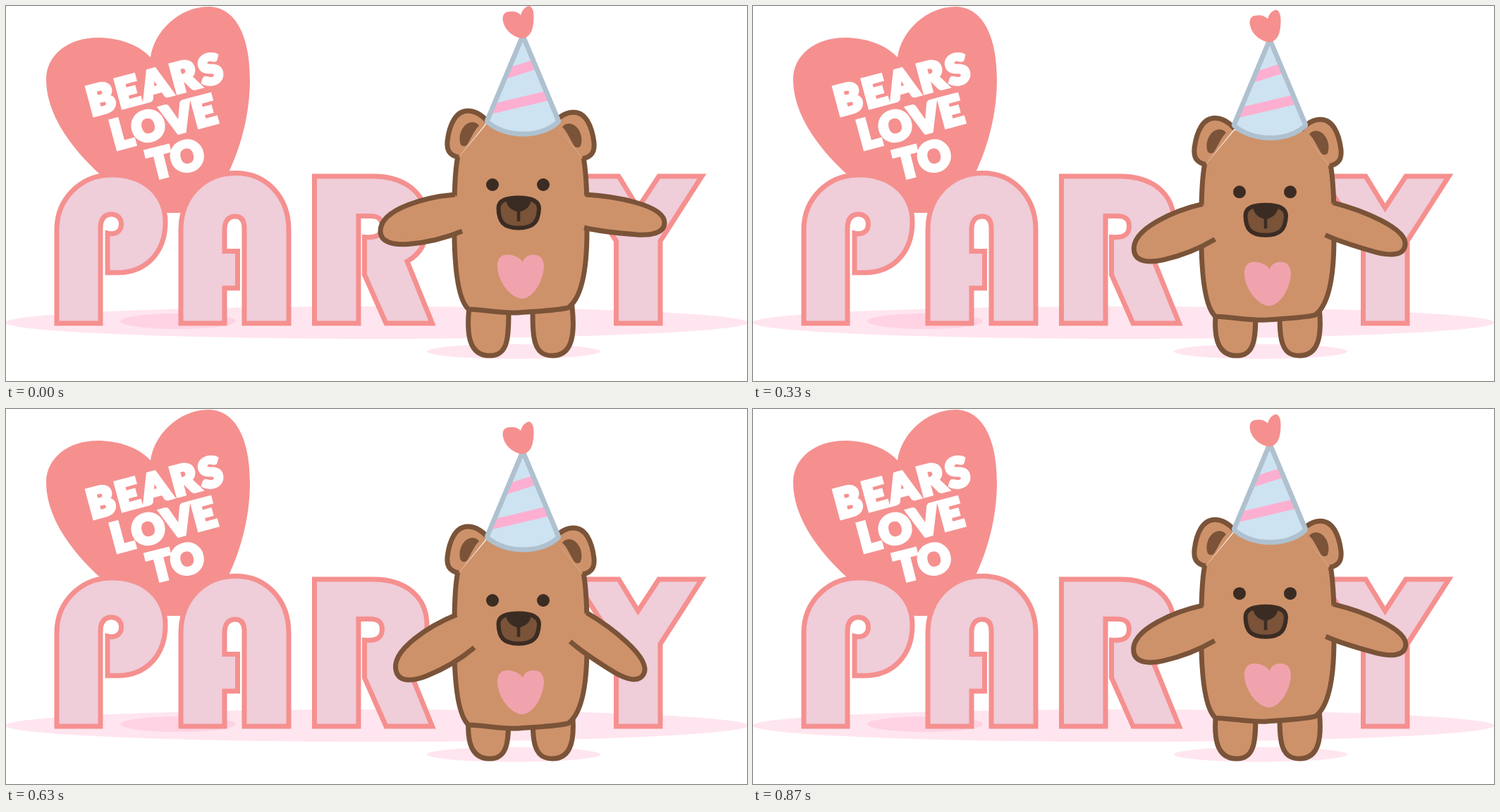
Write an HTML page that moves like this. It is 1051 px wide and 533 px high and loops after 900 ms.

```html
<!DOCTYPE html>
<html lang="en">
<head>
<meta charset="utf-8">
<title>Bears love to party</title>
<style>
  @property --body { syntax: "<length>"; inherits: true; initial-value: 0px; }
  @property --hat { syntax: "<length>"; inherits: true; initial-value: 0px; }
  @property --left { syntax: "<angle>"; inherits: true; initial-value: 0deg; }
  @property --right { syntax: "<angle>"; inherits: true; initial-value: 0deg; }

  html, body { margin: 0; width: 100%; height: 100%; overflow: hidden; background: #fff; }
  svg { display: block; width: 1051px; height: 533px; animation: dance 900ms infinite; }

  /* Every stretch advances in 30 ms steps */
  @keyframes dance {
    0%      { --body: 0px;    --hat: 0px;    --left: 0deg;     --right: 0deg;    animation-timing-function: steps(7); }
    23.333% { --body: 6px;    --hat: 3px;    --left: -4.6deg;  --right: 6deg;    animation-timing-function: steps(4); }
    36.667% { --body: 10.3px; --hat: 5.5px;  --left: -8.3deg;  --right: 11.3deg; animation-timing-function: steps(5); }
    53.333% { --body: 20.5px; --hat: 13.5px; --left: -21deg;   --right: 33deg;   animation-timing-function: steps(1); }
    56.667% { --body: 22.7px; --hat: 15px;   --left: -23.3deg; --right: 36.5deg; animation-timing-function: steps(1); }
    60%     { --body: 21.3px; --hat: 16px;   --left: -21.5deg; --right: 34deg;   animation-timing-function: steps(3); }
    70%     { --body: 18px;   --hat: 18px;   --left: -17.3deg; --right: 27.5deg; animation-timing-function: steps(4); }
    83.333% { --body: 16.5px; --hat: 20px;   --left: -15.5deg; --right: 25deg;   animation-timing-function: steps(2); }
    90%     { --body: 13.8px; --hat: 16.5px; --left: -12.5deg; --right: 19deg;   animation-timing-function: steps(2); }
    96.667%, 100% { --body: 8.2px; --hat: 7.5px; --left: -7.8deg; --right: 10.5deg; animation-timing-function: steps(1); }
  }

  .body { transform: translateY(var(--body)); }
  .hat { transform: translateY(var(--hat)); }
  .arm-left { transform-origin: 659px 263.5px; transform: rotate(var(--left)); }
  .arm-right { transform-origin: 815.6px 273px; transform: rotate(var(--right)); }

  .letters { fill: #efcdd9; stroke: #f5908f; stroke-width: 7; }
  .fur { fill: #ce926a; stroke: #7a5338; stroke-width: 7; }
  .brown { fill: #7a5338; }
  .dark { fill: #3b2c23; }
  .coral { fill: #f5908f; }
  .words { fill: #fff; stroke: #fff; stroke-width: 5; font: 900 57px Lato, "Open Sans", sans-serif; }
</style>
</head>
<body>
<svg viewBox="0 0 1051 533">
  <defs>
    <g id="ear">
      <path class="fur" d="M642 215C628 212 625 204 626 192C629 168 638 149 655 149C665 149 674 154 683 164"/>
      <path class="brown" d="M645 197C640 184 648 166 661 165C666 165 670 168 671 170C663 178 660 188 654 197C651 200 648 200 645 197Z"/>
    </g>
  </defs>

  <g fill="#ffe5ef">
    <ellipse cx="525.5" cy="450" rx="526" ry="23"/>
    <ellipse cx="244" cy="448" rx="82" ry="11" fill="#ffd3e3"/>
    <ellipse cx="720" cy="491" rx="123" ry="10.5"/>
  </g>

  <path class="coral" d="M205 73C187 54 159 45 130 45C88 45 57 70 57 104C57 160 102 210 131 237C165 275 195 294 232 294H246C280 285 305 255 317 234C335 195 346 150 346 104C346 40 324 1 287 1C247 1 210 35 205 73Z"/>
  <g class="words">
    <text transform="translate(121.500 156.500) rotate(-15)" letter-spacing="3.8">BEARS</text>
    <text transform="translate(155 204.500) rotate(-15)" letter-spacing="1.7">LOVE</text>
    <text transform="translate(207 247) rotate(-14)" letter-spacing="-.5">TO</text>
  </g>

  <g class="letters">
    <path d="M72 451V318C72 274 106 240 150 240C197 240 226 269 226 307C226 351 198 379 158 379H144V323C157 326 163.500 319 163.500 310C163.500 301 157 296 150 296C140 296 134 302 134 316V451Z"/>
    <path d="M248 451V318C248 271 281 237.500 326 237.500C369 237.500 401 271 401 318V451H338V316C338 304 333 299 325 299C316 299 310 305 310 318V348.500H328.500V401H310V451Z"/>
    <path d="M437.500 242H521C568 242 597 268 597 307C597 338 588 352 569 363L604.500 451H539L508.500 382V328.500C526 330 533.500 325 533.500 313C533.500 302 527 298.500 516 298.500H500V451H437.500Z"/>
    <path d="M806 242H869L896.500 287L926 242H987L928 334V451H865.500V334Z"/>
  </g>

  <g class="fur">
    <path d="M657 428C653 465 656 497 686 497C713 497 713 470 713 428Z"/>
    <path d="M803 428C807 465 804 497 775 497C747 497 747 470 747 428Z"/>
  </g>

  <g class="body">
    <path class="fur" d="M641 213C637 232 636 260 636 290C635 340 636 413 656 431C680 432 700 436 725 436C750 434 780 433 797 429C820 413 824 360 824 320C825 280 823 235 819 215"/>
    <path fill="#ce926a" d="M643 214L683 166C705 174 760 174 779 168L817 216L800 250H660Z"/>
    <use href="#ear"/>
    <use href="#ear" transform="translate(1460 2) scale(-1 1)"/>
    <circle class="dark" cx="690" cy="254" r="9"/>
    <circle class="dark" cx="762" cy="254" r="9"/>
    <path class="brown" stroke="#3b2c23" stroke-width="6" d="M698.500 288C698 276 710 272.500 727 272.500C744 272.500 756 276 756 288C755 306 749 315.500 727 315.500C705 315.500 699 306 698.500 288Z"/>
    <path class="dark" d="M709 276C715 272 739 272 745 276C743 287 735 291 727 293C719 291 711 287 709 276Z"/>
    <path stroke="#3b2c23" stroke-width="4.500" d="M727 290V306"/>
    <path fill="#f0a3ad" d="M733 364C735 356 742 353.500 749 353.500C759 354 763 361 763 371C761 395 746 416 731 416C716 414 699 394 697 372C696 360 702 353 711 353.500C722 354 729 358 733 364Z"/>
    <g class="arm-left">
      <path fill="#ce926a" d="M636 268L658 285L647 320L600 330V285Z"/>
      <path class="fur" d="M637 268C600 271 531 287 531 320C531 336 550 340 570 338.500C600 336 628 328 647 320"/>
    </g>
    <g class="arm-right">
      <path fill="#ce926a" d="M823 268L803 285L820 315L860 315V280Z"/>
      <path class="fur" d="M822 268C860 270 934 282 934 308C934 324 912 326 895 325C870 323 840 320 820 315"/>
    </g>
  </g>

  <g class="hat">
    <path fill="#cee3f1" d="M733 42L682 164C708 188 760 188 784 164Z"/>
    <path fill="#fdafd1" d="M715 87L746 77L752 90L708 104ZM694 138L765 121L771 134L686 154Z"/>
    <path fill="none" stroke="#afc1cf" stroke-width="7" stroke-linejoin="bevel" d="M733 42L682 164C708 188 760 188 784 164Z"/>
    <path class="coral" d="M730 13C732 5 738 0 742 0C747 1 749 9 748.500 18C748 32 745 43 734 46C722 46 708 36 705 22C703 12 708 8 714 8C721 7 727 9 730 13Z"/>
  </g>
</svg>
</body>
</html>
```
